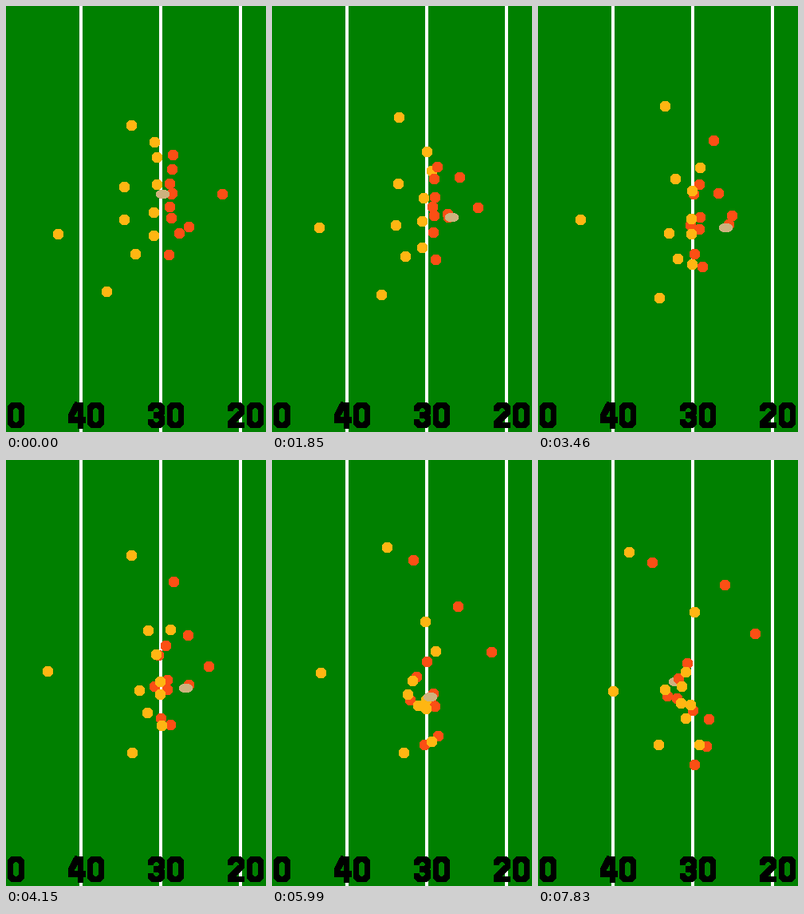
Animation of 326 by 533 pixels, one loop 8000 ms. Source, as a matplotlib script:

```python
import numpy as np
import matplotlib.pyplot as plt
from matplotlib.animation import FuncAnimation
from matplotlib.patches import Polygon, Rectangle

W, H, DPI = 326, 533, 64
LOOP, INTERVAL, STEP = 8000, 40, 230
LAST = 34
GRASS, GOLD, RED, BALL = "#008000", "#ffb612", "#fb4f14", "#cdb27e"

# Block digits as strokes in a 21 x 32 cell
ARCH = [(3.5, 10.5), (3.5, 7), (7, 3.5), (14, 3.5), (17.5, 7), (17.5, 12.5)]
HOOK = ARCH + [(14.5, 16), (7.5, 16)]


def mirror(stroke):
    return [(x, 32 - y) for x, y in stroke]


DIGITS = {
    "0": [ARCH + mirror(ARCH)[::-1] + ARCH[:2]],
    "2": [ARCH + [(4, 25.5), (4, 28.5), (21, 28.5)]],
    "3": [HOOK, mirror(HOOK)],
    "4": [[(15, 0), (15, 32)], [(12, 1), (3.5, 17), (3.5, 22), (21.5, 22)]],
}

fig = plt.figure(figsize=(W / DPI, H / DPI), dpi=DPI, facecolor=GRASS)
ax = fig.add_axes([0, 0, 1, 1])
ax.set_xlim(0, W)
ax.set_ylim(H, 0)
ax.axis("off")


def draw_digit(char, left, top=496):
    for stroke in DIGITS[char]:
        x, y = np.array(stroke).T
        ax.plot(x + left, y + top, color="black", lw=7 * 72 / DPI,
                solid_joinstyle="miter", solid_capstyle="butt",
                antialiased=False, zorder=1)


def octagon(w, h, flat_w, flat_h):
    """Corners of an octagon around the origin."""
    a, b, c, d = w / 2, h / 2, flat_w / 2, flat_h / 2
    return np.array([(-a, -d), (-c, -b), (c, -b), (a, -d),
                     (a, d), (c, b), (-c, b), (-a, d)])


def blob(shape, color):
    patch = Polygon(shape, fc=color, lw=0, antialiased=False, snap=False, zorder=3)
    return ax.add_patch(patch)


def run(*points):
    """Three points: a curve from a standing start; four: a running cubic."""
    s = np.arange(LAST + 1) / LAST
    if len(points) == 3:
        knots, power = np.array([0, 21, LAST]) / LAST, 1.6
    else:
        knots, power = np.array([0, 15, 26, LAST]) / LAST, 1
    degree = len(points) - 1
    return np.column_stack([
        np.polyval(np.polyfit(knots ** power, axis, degree), s ** power)
        for axis in zip(*points)])


DOT = octagon(13, 13, 5, 5)
EGG = octagon(16, 10.6, 7, 3)
players = []


def player(color, *points):
    track = run(*points)
    players.append((blob(DOT, color), np.rint(track) + 0.5, color))
    return track


for x in (92, 192, 292):
    ax.add_patch(Rectangle((x, 0), 4, H, fc="white", lw=0, antialiased=False))
draw_digit("0", 2)
for tens, mid in (("4", 100), ("3", 200), ("2", 300)):
    draw_digit(tens, mid - 22)
    draw_digit("0", mid + 2)

# Defence
player(GOLD, (157, 149), (154, 114), (114, 115))
player(GOLD, (186, 170), (207, 222), (185, 265))
player(GOLD, (189, 189), (193, 231), (176, 276), (179, 304))
player(GOLD, (189, 223), (193, 287), (191, 306))
player(GOLD, (148, 226), (184, 209), (196, 190))
player(GOLD, (185, 258), (194, 300), (185, 323))
player(GOLD, (148, 267), (169, 291), (159, 287))
player(GOLD, (185, 287), (197, 341), (202, 356))
player(GOLD, (65, 285), (53, 263), (94, 289))
player(GOLD, (162, 310), (180, 314), (180, 283))
player(GOLD, (126, 357), (162, 367), (151, 356))

# Offence: line, ends, then the receiver and the two backs
player(RED, (209, 186), (198, 241), (187, 254))
player(RED, (208, 204), (187, 254), (174, 298))
player(RED, (205, 222), (201, 286), (194, 313))
player(RED, (207, 235), (181, 291), (162, 295))
player(RED, (205, 251), (202, 295), (214, 324))
player(RED, (207, 265), (192, 336), (196, 381))
player(RED, (204, 311), (207, 336), (211, 358))
player(RED, (217, 284), (230, 205), (234, 156))
player(RED, (229, 276), (220, 168), (177, 125), (143, 128))
passer = player(RED, (208, 234), (243, 262), (275, 240), (272, 217))
runner = player(RED, (271, 235), (239, 273), (202, 292), (176, 273))

# The ball is snapped to the passer, then handed to the runner
s = np.arange(LAST + 1)[:, None]
snap, hand_off = np.clip(s / 2, 0, 1), np.clip((s - 8) / 7, 0, 1)
carry = (1 - snap) * (196, 235) + snap * (passer + (5, 4))
carry = np.rint((1 - hand_off) * carry + hand_off * (runner + (-4, 4))) + 0.5
ball = blob(EGG, BALL)


def update(frame):
    k = min((frame * INTERVAL + 20) // STEP, LAST)
    for dot, track, color in players:
        dot.set_xy(DOT + track[k])
        if color == GOLD:
            dot.set_zorder(2 if k < 11 else 4)
    ball.set_xy(EGG + carry[k])
    ball.set_zorder(5 if k < 28 else 1.5)


anim = FuncAnimation(fig, update, frames=LOOP // INTERVAL, interval=INTERVAL,
                     init_func=lambda: update(0), repeat=True)
plt.show()
```
